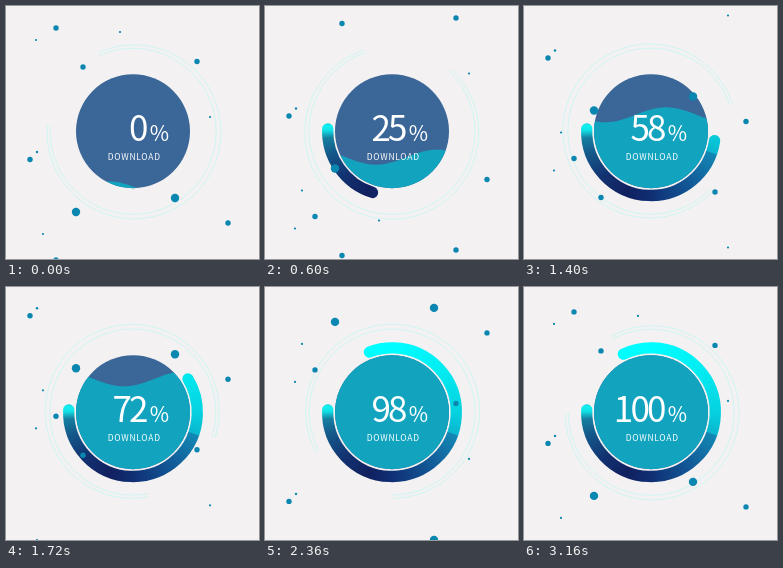
Animation of 253 by 253 pixels, one loop 3.2 s. Source, as an HTML page with a canvas:

```html
<!DOCTYPE html>
<html lang="en">
<head>
<meta charset="utf-8">
<title>Download progress</title>
<style>
  html, body { margin: 0; width: 100%; height: 100%; overflow: hidden; background: #f3f1f2; }
  canvas { display: block; width: 253px; height: 253px; }
</style>
</head>
<body>
<canvas id="stage"></canvas>
<script>
const SIZE = 253, LOOP = 3200, STEP = 40, FILL_TIME = 2400;
const CX = 127, CY = 125.2, DISC = 57, TAU = Math.PI * 2;
const FONT = '"Noto Sans CJK SC", "Noto Sans CJK JP", "Noto Sans CJK", "Noto Sans", sans-serif';
const rad = deg => deg * Math.PI / 180;

const canvas = document.getElementById('stage');
const ctx = canvas.getContext('2d');
const scale = window.devicePixelRatio || 1;
canvas.width = canvas.height = Math.round(SIZE * scale);

// Floating dots: x, y at the start, radius
const DRIFT = 232;
const dots = [
  [77, 61, 2.7], [50, 22, 2.7], [30, 34, 1.1], [114, 26, 1.1],
  [191, 55.5, 2.7], [204, 111, 1.1], [31, 146, 1.2], [24, 153.5, 2.7],
  [70, 206, 4.2], [169, 192, 4.2], [37, 228, 1.1], [222, 217, 2.7]
];

// Colours of the progress arc by direction in degrees
const GRAD_FROM = 215;
const arcFill = ctx.createConicGradient(rad(GRAD_FROM), CX, CY);
[
  [215, '#00ffff'], [275, '#00fcff'], [316, '#02eef3'], [0, '#06d2e0'],
  [19, '#0ab6ce'], [20, '#1388b4'], [53, '#125a98'], [90, '#102f74'],
  [111, '#11205f'], [135, '#12306f'], [160, '#14588a'], [174, '#167f9f'],
  [181, '#10e4e8'], [185, '#10f0f0'], [190, '#18a0b4']
].forEach(([deg, color]) =>
  arcFill.addColorStop(((deg - GRAD_FROM + 360) % 360) / 360, color));

function circle(x, y, r, color) {
  ctx.beginPath();
  ctx.arc(x, y, r, 0, TAU);
  ctx.fillStyle = color;
  ctx.fill();
}

function drawRings(t) {
  const gap = rad(215 + 360 * t / LOOP), half = rad(31);
  ctx.lineWidth = 0.8;
  ctx.lineCap = 'butt';
  ctx.strokeStyle = '#c6f6f2';
  [[87, 1.2], [83, 0.2]].forEach(([r, shift]) => {
    ctx.beginPath();
    ctx.arc(CX - shift * Math.cos(gap), CY - shift * Math.sin(gap), r,
      gap + half, gap - half + TAU);
    ctx.stroke();
  });
}

function drawArc(part) {
  if (part <= 0) return;
  ctx.beginPath();
  ctx.arc(CX, CY, 64.3, rad(182), rad(182 - 297.5 * part), true);
  ctx.lineWidth = 11.3;
  ctx.lineCap = 'round';
  ctx.strokeStyle = arcFill;
  ctx.stroke();
}

function drawDots(t) {
  const rise = DRIFT * t / LOOP;
  dots.forEach(([x, y, r]) => {
    for (let k = -1; k <= 1; k++) circle(x, y - rise + k * DRIFT, r, '#0a87b0');
  });
}

function drawWater(t) {
  const level = 183 - 0.053 * Math.min(t, FILL_TIME + 200);
  const crest = -19 + 0.115 * t;
  ctx.save();
  ctx.beginPath();
  ctx.arc(CX, CY, DISC, 0, TAU);
  ctx.clip();
  ctx.beginPath();
  ctx.moveTo(68, 190);
  for (let x = 68; x <= 188; x += 2) {
    ctx.lineTo(x, level - 7.5 * Math.cos(TAU * (x - crest) / 122));
  }
  ctx.lineTo(188, 190);
  ctx.fillStyle = '#12a4bf';
  ctx.fill();
  ctx.restore();
}

function drawText(percent) {
  ctx.fillStyle = '#fff';
  ctx.textBaseline = 'alphabetic';
  ctx.textAlign = 'center';
  ctx.font = '300 35px ' + FONT;
  [...String(percent)].reverse().forEach((digit, i) =>
    ctx.fillText(digit, 132.7 - 16.6 * i, 135.3));
  ctx.font = '300 21px ' + FONT;
  ctx.fillText('%', 153.3, 134.8);
  ctx.textAlign = 'left';
  ctx.font = '400 8.5px ' + FONT;
  ctx.letterSpacing = '0.7px';
  ctx.fillText('DOWNLOAD', 101.8, 154.2);
  ctx.letterSpacing = '0px';
}

function draw(t) {
  const part = Math.min(t / FILL_TIME, 1);
  ctx.setTransform(scale, 0, 0, scale, 0, 0);
  ctx.fillStyle = '#f3f1f2';
  ctx.fillRect(0, 0, SIZE, SIZE);
  drawRings(t);
  drawArc(part);
  circle(CX, CY, DISC, '#3a6698');
  drawDots(t);
  drawWater(t);
  drawText(Math.round(part * 100));
}

const start = performance.now();
function tick() {
  const t = (performance.now() - start) % LOOP;
  draw(Math.floor(t / STEP) * STEP);
  requestAnimationFrame(tick);
}
tick();
</script>
</body>
</html>
```
